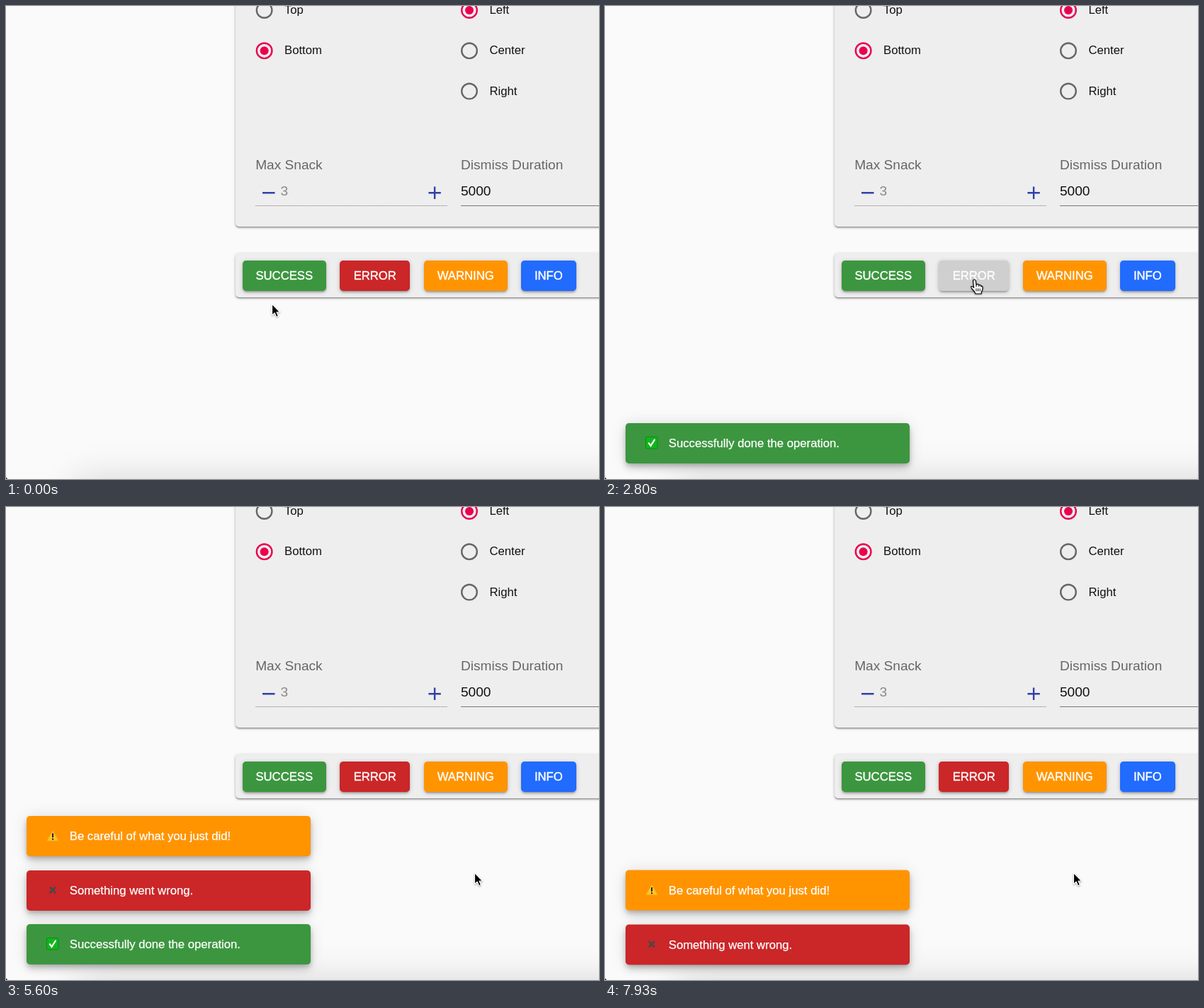
Animation, 837 px wide and 669 px high, one loop 8 s. Source, as an HTML page:

```html
<!DOCTYPE html>
<html lang="en">
<head>
<meta charset="utf-8">
<title>Snackbar demo</title>
<style>
  html, body { margin: 0; width: 100%; height: 100%; overflow: hidden; background: #fafafa; }
  #stage {
    position: relative; width: 837px; height: 669px; overflow: hidden; background: #fafafa;
    font: 16.7px/24px "Liberation Sans", Arial, sans-serif; color: #111;
  }
  #stage div, #stage svg { position: absolute; }
  .card {
    left: 323.5px; width: 600px; border-radius: 4.8px; background: #eee;
    box-shadow: 0 1px 4px rgba(0,0,0,.24), 0 2px 2px rgba(0,0,0,.18), 0 2px 1px -1px rgba(0,0,0,.16);
  }
  .text { white-space: pre; }
  .large { font-size: 19.1px; }
  .button {
    top: 359.6px; height: 43px; line-height: 43px; border-radius: 4.8px;
    text-align: center; color: #fff; -webkit-text-stroke: .4px #fff;
  }
  .snack {
    left: 28.6px; width: 401.8px; height: 57.3px; border-radius: 4.8px; color: #fff;
    box-shadow: 0 3.6px 6px -1px rgba(0,0,0,.2), 0 7px 12px rgba(0,0,0,.14), 0 1px 21px rgba(0,0,0,.12);
  }
  .snack .text { left: 61.2px; top: 17px; -webkit-text-stroke: .25px #fff; }
  .snack svg { left: 28.4px; top: 19px; }
  .dock { left: 100px; top: 672px; width: 1100px; height: 200px; box-shadow: 0 0 50px rgba(0,0,0,.17); }
  .corner { left: 0; top: 667px; width: 2px; height: 2px; background: #333; border-radius: 0 2px 0 0; }
  #cursor { left: 0; top: 0; overflow: visible; filter: drop-shadow(0 1px 1px rgba(0,0,0,.35)); }
</style>
</head>
<body>
<div id="stage">
  <div class="card" style="top:-60px;height:371.8px"></div>
  <div class="card" style="top:349.6px;height:62.4px"></div>
  <svg id="controls" width="837" height="320" fill="none">
    <g stroke="#3040a8" stroke-width="2.4">
      <path d="M362 264.3H379.5M596.4 264.3H613.8M605.1 255.6V273"/>
    </g>
    <path d="M352.5 282.5H623" stroke="#777" stroke-dasharray="1.2 1.2"/>
    <path d="M642 282.5H837" stroke="#777" stroke-width="1.2"/>
  </svg>
  <div class="dock"></div>
  <div class="corner"></div>
</div>
<script>
const LOOP = 8000;
const EASE_OUT = 'cubic-bezier(0,0,.2,1)';
const SHARP = 'cubic-bezier(.4,0,.6,1)';
const STANDARD = 'cubic-bezier(.4,0,.2,1)';
const GREY = '#cfcfcf';
const REST = '0 1.2px 6px rgba(0,0,0,.2), 0 2.4px 2.4px rgba(0,0,0,.14), 0 3.6px 1.2px -2.4px rgba(0,0,0,.12)';
const RAISED = '0 6px 6px -3.6px rgba(0,0,0,.2), 0 9.6px 12px 1.2px rgba(0,0,0,.14), 0 3.6px 16.7px 2.4px rgba(0,0,0,.12)';
const stage = document.getElementById('stage');

function add(parent, className, css, html = '') {
  const el = document.createElement('div');
  el.className = className;
  el.style.cssText = css;
  el.innerHTML = html;
  parent.append(el);
  return el;
}

// Rows are [ms, value, easing]; a row without easing holds until the next one.
function track(el, prop, rows) {
  const frames = rows.map(([ms, value, easing = 'step-end']) =>
    ({ offset: ms / LOOP, [prop]: value, easing }));
  frames.push({ offset: 1, [prop]: rows.at(-1)[1] });
  el.animate(frames, { duration: LOOP, iterations: Infinity });
}

function label(x, middle, text, className = '', color = '#111') {
  add(stage, 'text ' + className, `left:${x}px;top:${middle - 12}px;color:${color}`, text);
}

function radio(x, y, text, checked) {
  const color = checked ? '#ea004f' : '#666';
  const dot = checked ? `<circle cx="${x}" cy="${y}" r="6" fill="${color}"/>` : '';
  document.getElementById('controls').insertAdjacentHTML('beforeend',
    `<circle cx="${x}" cy="${y}" r="10.8" stroke="${color}" stroke-width="2.4"/>${dot}`);
  label(x + 28.4, Math.round(y), text);
}

radio(364.6, 6, 'Top');
radio(364.6, 63.3, 'Bottom', true);
radio(654, 6, 'Left', true);
radio(654, 63.3, 'Center');
radio(654, 120.6, 'Right');
label(352.2, 225, 'Max Snack', 'large', '#666');
label(642, 225, 'Dismiss Duration', 'large', '#666');
label(387.6, 262, '3', 'large', '#888');
label(642, 262, '5000', 'large');

const buttons = [
  { text: 'SUCCESS', x: 333.5, w: 118.5, color: '#3c963f', enter: 530, leave: 2375, press: 1350, release: 1480 },
  { text: 'ERROR', x: 471.2, w: 99.2, color: '#cb2628', enter: 2425, leave: 3990, press: 2920, release: 3050 },
  { text: 'WARNING', x: 589.5, w: 118.4, color: '#ff9400', enter: 4050, leave: 5085, press: 4400, release: 4600 },
  { text: 'INFO', x: 727, w: 77.7, color: '#216bff' },
];
for (const { text, x, w, color, enter, leave, press, release } of buttons) {
  const el = add(stage, 'button', `left:${x}px;width:${w}px;background:${color};box-shadow:${REST}`, text);
  if (!enter) continue;
  track(el, 'backgroundColor', [
    [0, color], [enter, color, STANDARD], [enter + 250, GREY],
    [leave, GREY, STANDARD], [leave + 250, color]]);
  track(el, 'boxShadow', [
    [0, REST], [press, REST, STANDARD], [press + 130, RAISED],
    [release, RAISED, STANDARD], [release + 250, REST]]);
}

const icons = {
  check: `<rect x=".5" y=".5" width="16.5" height="16.5" rx="1.5" fill="#12b51c" stroke="#0b8d14"/>
    <path d="M4.3 8.6L7.5 13L13.3 3.8" fill="none" stroke="#fff" stroke-width="2.2"/>`,
  cross: `<path d="M4.8 4.6L13 13M13 4.6L4.8 13" stroke="#484848" stroke-width="2.7"/>`,
  alert: `<path d="M9 1.8L17 16H1Z" fill="#fcc428" stroke="#f2b21c" stroke-linejoin="round"/>
    <path d="M9 5.5V11.2M9 12.8V14.8" stroke="#222" stroke-width="2"/>`,
};

const OUT = -431, STEP = 76.5, SHIFT = 6690, SHIFT_END = 7190;
function snack(text, icon, color, top, shownAt, closedAt) {
  const el = add(stage, 'snack', `top:${top}px;background:${color}`,
    `<svg width="18" height="18">${icons[icon]}</svg><div class="text">${text}</div>`);
  const rows = [[0, `${OUT}px 0px`], [shownAt, `${OUT}px 0px`, EASE_OUT], [shownAt + 225, '0px 0px']];
  const visible = [[0, 0], [shownAt, 1]];
  if (closedAt) {
    rows.push([closedAt, '0px 0px', SHARP], [closedAt + 195, `${OUT}px 0px`]);
    visible.push([closedAt + 195, 0]);
  } else {
    rows.push([SHIFT, '0px 0px', 'ease'], [SHIFT_END, `0px ${STEP}px`]);
  }
  track(el, 'translate', rows);
  track(el, 'opacity', visible);
}
snack('Successfully done the operation.', 'check', '#3c963f', 590.2, 1480, 6480);
snack('Something went wrong.', 'cross', '#cb2628', 513.7, 3050);
snack('Be careful of what you just did!', 'alert', '#ff9400', 437.2, 4600);

stage.insertAdjacentHTML('beforeend', `
  <svg id="cursor" width="20" height="24" stroke-linejoin="round">
    <path id="arrow" d="M.5 .5V16.5L4.2 13L6.6 18.8L9.4 17.6L7 12H11.8Z" fill="#000" stroke="#fff" stroke-width="1.1"/>
    <g id="hand" stroke="#000" stroke-width="1.2">
      <path fill="#fff" d="M-1.5 2Q-1.5 0 .5 0Q2.3 0 2.4 2L3 7.5Q3.8 6 5.2 6.4Q6.6 6.8 6.8 8Q8 6.9 9.1 7.9Q9.7 8.4 9.8 9.2Q11.3 8.7 12 10.2Q12.3 13 11.5 15L10.3 17.2V20H1.8L.8 17.5L-3 13Q-5 10.5 -4 9.6Q-2.5 9 -.4 11.4Z"/>
      <path d="M3 12.5V16.5M5.6 12.5V16.5M8.2 12.5V16.5M3 7.5V10M6.8 8V10M9.8 9.2V10.5" stroke-width="1"/>
    </g>
  </svg>`);

const stops = [
  ['375px 421px', 0, 300], ['404px 379px', 800, 2150], ['521px 387px', 2650, 3800],
  ['658px 385px', 4300, 4950], ['661px 517px', 5450],
];
track(document.getElementById('cursor'), 'translate', stops.flatMap(([at, arrive, depart]) =>
  depart ? [[arrive, at], [depart, at, 'ease-in-out']] : [[arrive, at]]));

const hovers = buttons.filter(b => b.enter).flatMap(b => [[b.enter, 1], [b.leave, 0]]);
track(document.getElementById('hand'), 'opacity', [[0, 0], ...hovers]);
track(document.getElementById('arrow'), 'opacity', [[0, 1], ...hovers.map(([ms, on]) => [ms, 1 - on])]);
</script>
</body>
</html>
```
